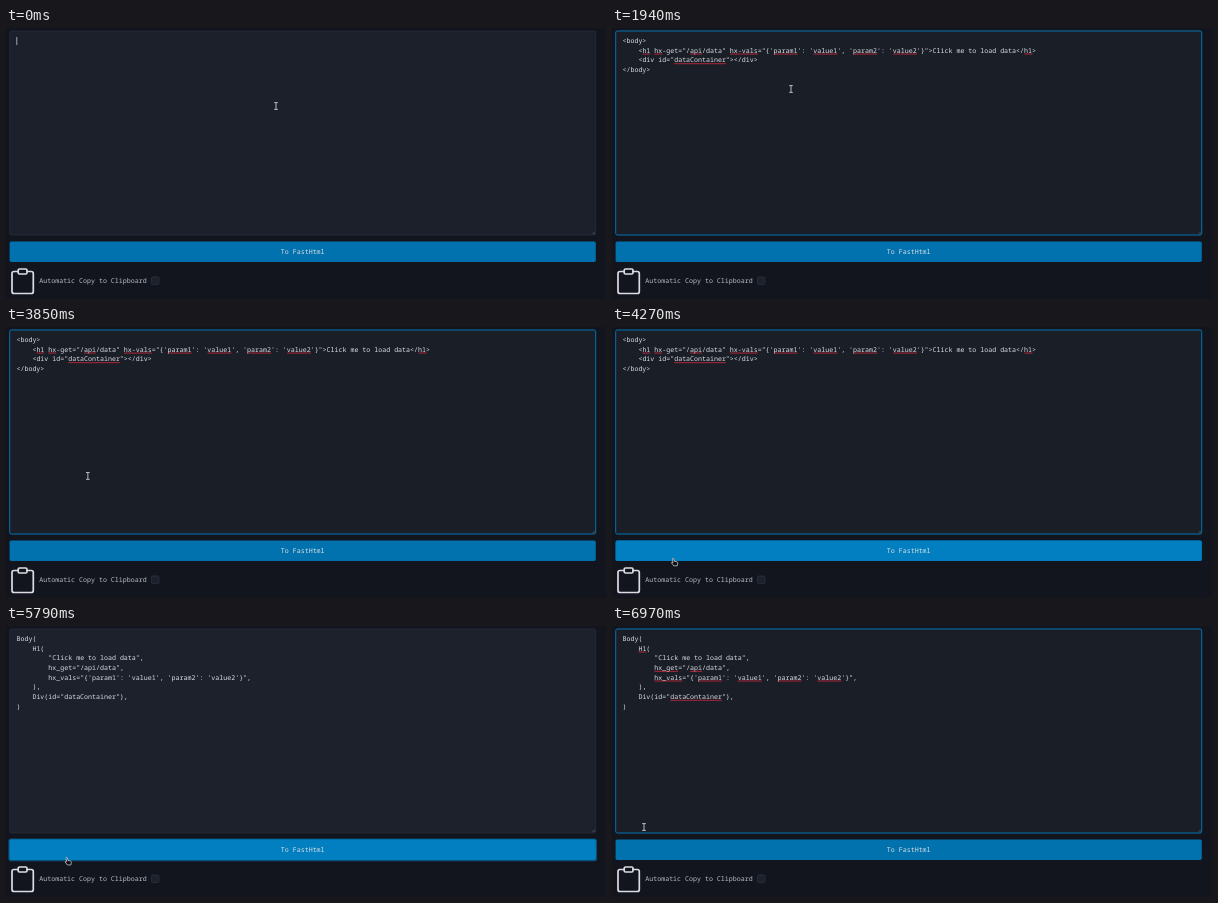
An HTML page for the animation above (7 s loop, 600 by 271 pixels).

```html
<!DOCTYPE html>
<html lang="en">
<head>
<meta charset="utf-8">
<title>HTML to FastHtml</title>
<style>
html, body { margin: 0; height: 100%; overflow: hidden; background: #12151e; }
svg { display: block; width: 100vw; height: 100vh; }
text { font: 6.63px "Noto Sans Mono", "DejaVu Sans Mono", monospace; fill: #dcdfe5;
  white-space: pre; text-rendering: geometricPrecision; }
.typo { stroke: #d2283c; stroke-width: .8; }
#icon { fill: none; stroke: #dcdde3; stroke-width: 1.7; stroke-linecap: round; stroke-linejoin: round; }
#icon.done { stroke: #148a18; }
#check { visibility: hidden; }
.done #check { visibility: visible; }
.pointer { fill: #0b0c10; stroke: #dfe1e6; stroke-width: .7; stroke-linejoin: round; }
</style>
</head>
<body>
<svg viewBox="0 0 600 271">
  <rect x="3.7" y="3" width="586" height="204" rx="1.7" fill="#1c212c" stroke="#2a3140" stroke-width=".6"/>
  <rect id="focus" x="3.7" y="3" width="586" height="204" rx="1.7" fill="#1a1e27" stroke="#0271aa"/>
  <path d="M586.5 206l2.3-2.3M588 206.2l1-1" stroke="#8b909b" stroke-width=".4"/>
  <g id="before"></g>
  <g id="after"></g>
  <rect id="caret" width=".7" height="8" fill="#dcdfe5"/>

  <rect id="ring" x="3.2" y="213.2" width="587" height="21.2" rx="2" fill="none" stroke="#0b4f76" stroke-width="1.6"/>
  <rect x="3.6" y="213.6" width="586.2" height="20.4" rx="1.7" fill="#0172ad"/>
  <rect id="hover" x="3.6" y="213.6" width="586.2" height="20.4" rx="1.7" fill="#017fc0"/>
  <text x="296.7" y="226" text-anchor="middle">To FastHtml</text>

  <g id="icon">
    <path d="M12 243.5H8a2 2 0 0 0-2 2V263.500a2 2 0 0 0 2 2H25.300a2 2 0 0 0 2-2V245.500a2 2 0 0 0-2-2H21"/>
    <rect x="12.200" y="241" width="8.800" height="5" rx="1.300"/>
    <path id="check" d="M13 255.300l2.600 2.500 4.600-5"/>
  </g>
  <text x="33.3" y="255.300" style="fill:#b9bdc6">Automatic Copy to Clipboard</text>
  <rect x="145.400" y="249" width="7.600" height="7.600" rx="1.300" fill="#1c212c" stroke="#2a3140" stroke-width=".8"/>

  <g id="cursor">
    <path id="beam" d="M-1.800-3.400H1.800M-1.800 3.400H1.800M0-3.400V3.400" fill="none" stroke="#c9ccd2" stroke-width=".9"/>
    <path id="hand" class="pointer" d="M-1.500-3.500q.8-.7 1.300.2l.5 2.600 2.700.6q.9.300.7 1.300l-.5 2.600H-.3L-2.500.8q-.1-1 1.500-.2z"/>
    <path id="arrow" class="pointer" d="M-.5-3.500V3.500l1.600-1.400 1 2.200 1.200-.5-1-2.200h2z"/>
  </g>
</svg>
<script>
const LOOP = 7000, LEFT = 10.5, CHAR = 3.98, LINE = 9.65, BASE = 15.1;
const NS = "http://www.w3.org/2000/svg";
const $ = id => document.getElementById(id);

const html = `<body>
    <h1 hx-get="/api/data" hx-vals="{'param1': 'value1', 'param2': 'value2'}">Click me to load data</h1>
    <div id="dataContainer"></div>
</body>`;
const python = `Body(
    H1(
        "Click me to load data",
        hx_get="/api/data",
        hx_vals="{'param1': 'value1', 'param2': 'value2'}",
    ),
    Div(id="dataContainer"),
)`;

function add(parent, tag, attrs) {
  const el = document.createElementNS(NS, tag);
  for (const k in attrs) el.setAttribute(k, attrs[k]);
  return parent.appendChild(el);
}

// Code lines with the spell checker's underlines in their own group
function write(parent, code) {
  const typos = add(parent, "g", { class: "typo" });
  code.split("\n").forEach((line, i) => {
    const y = BASE + i * LINE, indent = line.search(/\S/);
    add(parent, "text", { x: LEFT + indent * CHAR, y }).textContent = line.trim();
    for (const m of line.matchAll(/hx-vals|hx_\w+|hx|api|[a-z]+\d|dataContainer/gi)) {
      const x1 = LEFT + m.index * CHAR;
      add(typos, "line", { x1, x2: x1 + m[0].length * CHAR, y1: y + 1.3, y2: y + 1.3 });
    }
  });
  return typos;
}

write($("before"), html);
const lateTypos = write($("after"), python);

const PASTE = 1390, CLICK = 4270, CONVERT = 4760, COPY = 5910;
const caretOn = [[0, 940], [PASTE, 1940], [2420, 2940], [COPY, 6880]];
const moves = [
  [0, 270, 78], [940, 270, 78], [940, 179, 61], [2940, 179, 61], [2940, 86, 131],
  [3820, 86, 131], [4000, 62, 235], [5790, 62, 235], [5900, 20, 250.5],
  [6880, 20, 250.5], [6970, 32, 201], [LOOP, 32, 201]
];

const ramp = (t, a, b) => Math.min(1, Math.max(0, (t - a) / (b - a)));
const within = (t, a, b) => t >= a && t < b;
const show = (el, on) => el.style.visibility = on ? "visible" : "hidden";

function pointerAt(t) {
  const i = moves.findIndex(m => m[0] > t);
  const [a, x, y] = moves[i - 1], [b, u, v] = moves[i], k = ramp(t, a, b);
  return [x + (u - x) * k, y + (v - y) * k];
}

function draw(t) {
  const blur = ramp(t, CLICK, 4450), refocus = ramp(t, COPY, 6090);
  $("focus").style.opacity = ramp(t, 0, 150) - blur + refocus;
  $("ring").style.opacity = blur - refocus;
  $("hover").style.opacity = ramp(t, 3850, 4000) - ramp(t, 5800, 5950);

  show($("before"), within(t, PASTE, CONVERT));
  show($("after"), t >= CONVERT);
  show(lateTypos, t >= 6880);

  const atEnd = within(t, PASTE, CONVERT);
  show($("caret"), caretOn.some(([a, b]) => within(t, a, b)));
  $("caret").setAttribute("x", atEnd ? LEFT + 7 * CHAR : LEFT);
  $("caret").setAttribute("y", atEnd ? 9 + 3 * LINE : 9);

  $("icon").setAttribute("class", within(t, COPY, 6420) ? "done" : "");

  const [x, y] = pointerAt(t);
  $("cursor").setAttribute("transform", `translate(${x} ${y})`);
  show($("beam"), y < 211);
  show($("hand"), y >= 211 && y < 238);
  show($("arrow"), y >= 238);
}

const start = performance.now();
function tick() {
  draw((performance.now() - start) % LOOP);
  requestAnimationFrame(tick);
}
tick();
</script>
</body>
</html>
```
